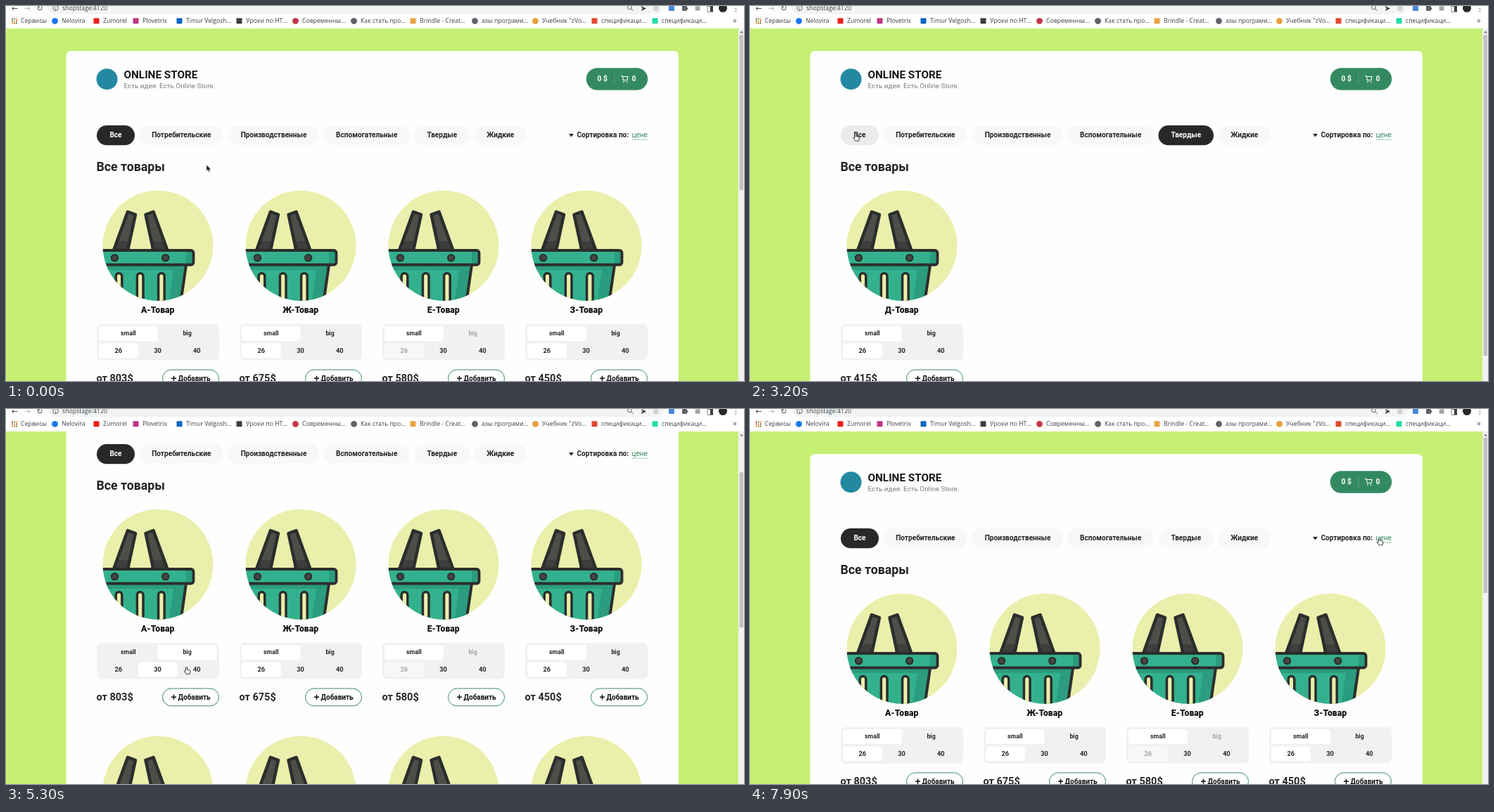
Animation, 1049 px wide and 534 px high, one loop 8000 ms. Source, as an HTML page:

```html
<!DOCTYPE html>
<html lang="ru">
<head>
<meta charset="utf-8">
<title>Online store</title>
<style>
html, body { margin: 0; width: 100%; height: 100%; overflow: hidden; background: #fff; }
svg { display: block; width: 1049px; height: 534px; font-family: Roboto, Inter, sans-serif; }
.bar text { font-family: "Open Sans", "Noto Sans", sans-serif; fill: #3c4043; }
.bar .icon { font-family: "DejaVu Sans", sans-serif; text-anchor: middle; }
.b { font-weight: 700; }
.mid { text-anchor: middle; }
</style>
</head>
<body>
<svg viewBox="0 0 1049 534">
  <defs>
    <clipPath id="view"><rect y="32" width="1041" height="502"/></clipPath>
    <clipPath id="disc"><circle cx="216" cy="341.3" r="78.5"/></clipPath>
    <g id="basket" clip-path="url(#disc)">
      <rect x="137" y="262" width="158" height="159" fill="#eaefab"/>
      <g id="handle">
        <path d="M173 293l11 4-11 51h-20z" fill="#4d4e49"/>
        <path d="M157 335h19v13h-24z" fill="#3f3e3c"/>
        <path d="M173 293l11 4-11 51h-20z" fill="none" stroke="#2b2e2c" stroke-width="4.5" stroke-linejoin="round"/>
      </g>
      <use href="#handle" transform="translate(382.5 0) scale(-1 1)"/>
      <path d="M130 369h126l-8 55h-118z" fill="#33b18e"/>
      <path d="M130 369h126l-8 55h-17l7-48h-108z" fill="#2b9c7e"/>
      <path d="M256 369l-8 55" stroke="#2b2e2c" stroke-width="4"/>
      <g id="slots" fill="#eaefab" stroke="#2b2e2c" stroke-width="3.5"></g>
      <rect x="120" y="348" width="146" height="20" fill="#33b18e"/>
      <rect x="256" y="348" width="10" height="20" fill="#2b9c7e"/>
      <rect x="120" y="348" width="146.5" height="20.5" rx="3.5" fill="none" stroke="#2b2e2c" stroke-width="3.8"/>
      <g fill="#434642" stroke="#2b2e2c" stroke-width="2">
        <circle cx="154.5" cy="358.6" r="4.7"/><circle cx="226.7" cy="358.6" r="4.7"/>
      </g>
    </g>
  </defs>
  <rect width="1049" height="534" fill="#c5f074"/>
  <g clip-path="url(#view)"><g id="page"></g></g>
  <rect x="1041" y="32" width="8" height="502" fill="#f1f1f1"/>
  <path d="M1043 38.500l2.500-3 2.500 3z" fill="#777"/>
  <rect id="thumb" x="1042.5" width="5.5" fill="#c1c1c1"/>
  <g id="bar" class="bar"></g>
  <path id="arrow" d="M0 0v9.300l2-2 1.600 3.500 1.500-.7-1.400-3.200h2.700z" fill="#111" stroke="#fff" stroke-width=".6"/>
  <path id="hand" d="M-1 6v-5q1-2 2 0v3l3 .7q2 .5 1.300 2.500l-1 3.400h-4.600l-2.700-4q0-2 2-.6z" fill="#fff" stroke="#222" stroke-width=".9"/>
</svg>
<script>
const $ = id => document.getElementById(id);
const text = (x, y, size, str, attrs = '') => `<text x="${x}" y="${y}" font-size="${size}" ${attrs}>${str}</text>`;
const rect = (x, y, w, h, r, fill, attrs = '') => `<rect x="${x}" y="${y}" width="${w}" height="${h}" rx="${r}" fill="${fill}" ${attrs}/>`;
const circle = (x, y, r, fill, attrs = '') => `<circle cx="${x}" cy="${y}" r="${r}" fill="${fill}" ${attrs}/>`;
const GREEN = '#348a60', INK = '#262626';

const bookmarks = [
  [79, 'Nelovira', '#1877f2', true], [138, 'Zumorel', '#f01c1c'], [194, 'Plovetrix', '#c13584'],
  [256, 'Timur Velgosh…', '#0a66c2'], [341, 'Уроки по HT…', '#3b3f43'], [421, 'Современны…', '#c2384a', true],
  [504, 'Как стать про…', '#5f6368', true], [588, 'Brindle - Creat…', '#e9a542'], [676, 'азы програми…', '#5f6368', true],
  [762, 'Учебник "zVo…', '#e8a13c', true], [846, 'спецификаци…', '#dd4a30'], [932, 'спецификаци…', '#22dba8']
];
const icons = [[12, '←'], [30, '→'], [48, '↻'], [906, '➤'], [924, '☆'], [983, '≡'], [1001, '◨'], [1037.5, '⋮']];

function drawBar() {
  let s = rect(0, 0, 1049, 32, 0, '#fff') + rect(59, -12, 876, 23.5, 11.7, '#f1f3f4');
  for (const [x, glyph] of icons) s += text(x, 6.5, 11, glyph, `class="icon" opacity="${glyph === '→' ? .4 : 1}"`);
  const ring = 'stroke="#5f6368"';
  s += circle(70.5, 3, 3.7, 'none', ring) + text(70.5, 5.5, 6.5, 'i', 'class="icon"');
  s += circle(886.5, 2, 2.8, 'none', ring) + `<path d="M888.500 4l3 3" ${ring}/>`;
  s += rect(961, 0, 7, 7, 1, '#5f6368') + circle(965, 0, 1.5, '#5f6368') + circle(968, 3.5, 1.5, '#5f6368');
  s += rect(942, -1, 8, 8, 1, '#4b86d9') + circle(1019, 3, 6, '#292929');
  s += text(80, 6, 8.7, 'shopstage:4120');
  const dots = ['#dc4b3e', '#4c9b55', '#e8a53a'];
  for (let i = 0; i < 9; i++) {
    const row = Math.floor(i / 3);
    s += rect(8 + i % 3 * 3, 17.5 + row * 3, 2, 2, 0, dots[(i + row) % 3]);
  }
  s += text(21, 24.3, 8.7, 'Сервисы');
  for (const [x, str, color, round] of bookmarks) {
    s += round ? circle(x - 9.5, 21.3, 4.4, color) : rect(x - 13.5, 17.2, 8, 8, 1, color);
    s += text(x, 24.3, 8.7, str);
  }
  return s + text(1033.5, 24.3, 10, '»');
}

const tabs = [
  ['Все', 129, 183], ['Потребительские', 189.5, 309], ['Производственные', 316, 445],
  ['Вспомогательные', 451, 574.5], ['Твердые', 580.5, 659], ['Жидкие', 665.5, 740]
];
const price = { А: 803, Ж: 675, Е: 580, З: 450, Д: 415, Г: 395, В: 370, Б: 340 };
const goods = ['АЖЕЗ', 'А', 'ЖЕВ', 'ЗГБ', 'Д'];

function option(x, w, y, label, size, on, off) {
  return (on ? rect(x, y, w, 21, 3.5, off ? '#f7f7f6' : '#fff') : '') +
    text(x + w / 2, y + 13.3, size, label, `class="b mid" fill="${off ? '#a5a5a5' : INK}"`);
}

function card(col, letter, kind, size) {
  const off = letter === 'Е';
  let s = `<g transform="translate(${col * 203} 0)"><use href="#basket"/>`;
  s += text(215.7, 436.6, 12.2, letter + '-Товар', 'class="mid" font-weight="900" fill="#111"');
  s += rect(129, 452.7, 174, 52, 7, '#f1f1f0');
  ['small', 'big'].forEach((label, i) => s += option(132 + i * 83.7, 83.7, 456, label, 8.8, i === kind, off && i === 1));
  ['26', '30', '40'].forEach((label, i) => s += option(132 + i * 55.7, 55.7, 480.5, label, 9.3, i === size, off && i === 0));
  s += text(128.5, 534.6, 14.5, `от ${price[letter]}$`, `class="b" fill="${INK}"`);
  s += rect(222.5, 518, 80, 24.8, 12.4, '#fff', `stroke="${GREEN}"`);
  s += '<path d="M235 530.200h7m-3.500-3.500v7" stroke="#111" stroke-width="1.6"/>';
  return s + text(244.5, 533.9, 10, 'Добавить', 'class="b" fill="#111"') + '</g>';
}

function drawHeader() {
  const white = 'class="b" fill="#fff"';
  let s = rect(85.5, 64, 870.5, 1200, 7, '#fefefe') + circle(143.5, 104.2, 15, '#2389a3');
  s += text(167.5, 103, 15.3, 'ONLINE STORE', 'class="b" fill="#181818"');
  s += text(167.5, 116.7, 9.9, 'Есть идея. Есть Online Store.', 'fill="#7b7b7b"');
  s += rect(824.7, 88.2, 87.5, 31.6, 15.8, GREEN) + rect(864.5, 96, .7, 16, 0, '#6aaa88');
  s += text(840.5, 107.2, 10.3, '0 $', white) + text(889.5, 107.2, 10.3, '0', white);
  s += '<path d="M874 99.500h2l1.500 6h5.500l1-5h-7.500" fill="none" stroke="#fff" stroke-width="1.1"/>';
  s += circle(878, 108, .9, '#fff') + circle(882.5, 108, .9, '#fff');
  return s + rect(85.5, 144.2, 870.5, .8, 0, '#f3f3f3');
}

function drawPage(cat, hover, kind, size) {
  let s = drawHeader();
  tabs.forEach(([label, a, b], i) => {
    const on = i === cat;
    s += rect(a, 170, b - a, 28.3, 14.1, on ? '#282828' : i === hover ? '#ebebea' : '#f8f8f8');
    s += text((a + b) / 2, 187.4, 10.1, label, `class="b mid" fill="${on ? '#fff' : '#222'}"`);
  });
  s += '<path d="M800 182h7l-3.500 4.500z" fill="#222"/>';
  s += text(811.5, 187.4, 10.1, 'Сортировка по:', 'class="b" fill="#222"');
  s += text(889.5, 187.4, 10, 'цене', `fill="${GREEN}"`);
  s += `<path d="M890 190.200h22" stroke="${GREEN}" stroke-width=".8" stroke-dasharray="1.5 1"/>`;
  s += text(128.5, 235, 17.7, 'Все товары', 'class="b" fill="#232323"');
  [...goods[cat]].forEach((letter, i) => s += card(i, letter, i ? 0 : kind, i ? 0 : size));
  if (cat === 0) for (let i = 0; i < 4; i++) s += `<use href="#basket" x="${i * 203}" y="323"/>`;
  return s;
}

// Pointer: time, x, y
const path = [
  [0, 285, 226], [100, 342, 242], [300, 362, 268], [400, 338, 330], [500, 285, 338], [600, 236, 250],
  [900, 247, 188], [1200, 250, 186], [1600, 373.5, 187], [1700, 376, 186], [2200, 505, 186],
  [2500, 615, 186], [2800, 268, 196], [3000, 215, 196], [3200, 150, 181.5], [3400, 150, 181.5],
  [3700, 240, 300], [3800, 250.5, 313.5], [4100, 252, 343], [4400, 247, 348], [4900, 217, 367],
  [5300, 256.5, 367], [5600, 256.5, 367], [6100, 166, 367], [6400, 172, 346], [6900, 579, 249.5],
  [7100, 622, 233], [7400, 780, 190], [7600, 905, 160], [7900, 894.5, 183.3]
];
const pauses = [200, 700, 2100, 2900, 4300, 6200];
const scroll = [[0, 0], [3500, 0], [3600, 53], [3700, 107], [3800, 120], [6800, 120], [6900, 53.3], [7000, 13], [7100, 0]];
const catSteps = [[0, 0], [1000, 1], [1800, 2], [2200, 3], [2500, 4], [3400, 0]];
const kindSteps = [[0, 0], [4200, 1], [6400, 0]];
const sizeSteps = [[0, 0], [4900, 1], [5500, 2], [6100, 0]];

const last = (steps, t) => steps.findLast(k => k[0] <= t);
function mix(keys, t, c) {
  const a = last(keys, t), b = keys[keys.indexOf(a) + 1] || a;
  return a === b ? a[c] : a[c] + (b[c] - a[c]) * (t - a[0]) / (b[0] - a[0]);
}
const within = (x, y, x0, y0, x1, y1) => x >= x0 && x <= x1 && y >= y0 && y <= y1;

let drawn = '';
function render(ms) {
  let t = Math.floor(ms % 8000 / 100) * 100;
  if (pauses.includes(t)) t -= 100;
  const x = mix(path, t, 1), y = mix(path, t, 2), top = mix(scroll, t, 1);
  const cat = last(catSteps, t)[1];
  const hover = tabs.findIndex(([, a, b]) => within(x, y + top, a, 170, b, 198));
  const state = [cat, hover, last(kindSteps, t)[1], last(sizeSteps, t)[1]];
  if (state.join() !== drawn) {
    drawn = state.join();
    $('page').innerHTML = drawPage(...state);
  }
  $('page').setAttribute('transform', `translate(0 ${-top})`);
  $('thumb').setAttribute('y', 41 + top * .41);
  $('thumb').setAttribute('height', cat ? 457 : 221);
  const hand = hover >= 0 || within(x, y + top, 129, 453, 303, 505) || within(x, y + top, 889, 178, 913, 192);
  for (const id of ['arrow', 'hand']) {
    $(id).setAttribute('transform', `translate(${x} ${y})`);
    $(id).style.display = (id === 'hand') === hand ? '' : 'none';
  }
}

for (let i = 0; i < 3; i++) $('slots').innerHTML += rect(156.2 + i * 30.2, 380.5, 8.6, 50, 4.3, '#eaefab');
$('bar').innerHTML = drawBar();
function tick() {
  render(performance.now());
  requestAnimationFrame(tick);
}
tick();
</script>
</body>
</html>
```
